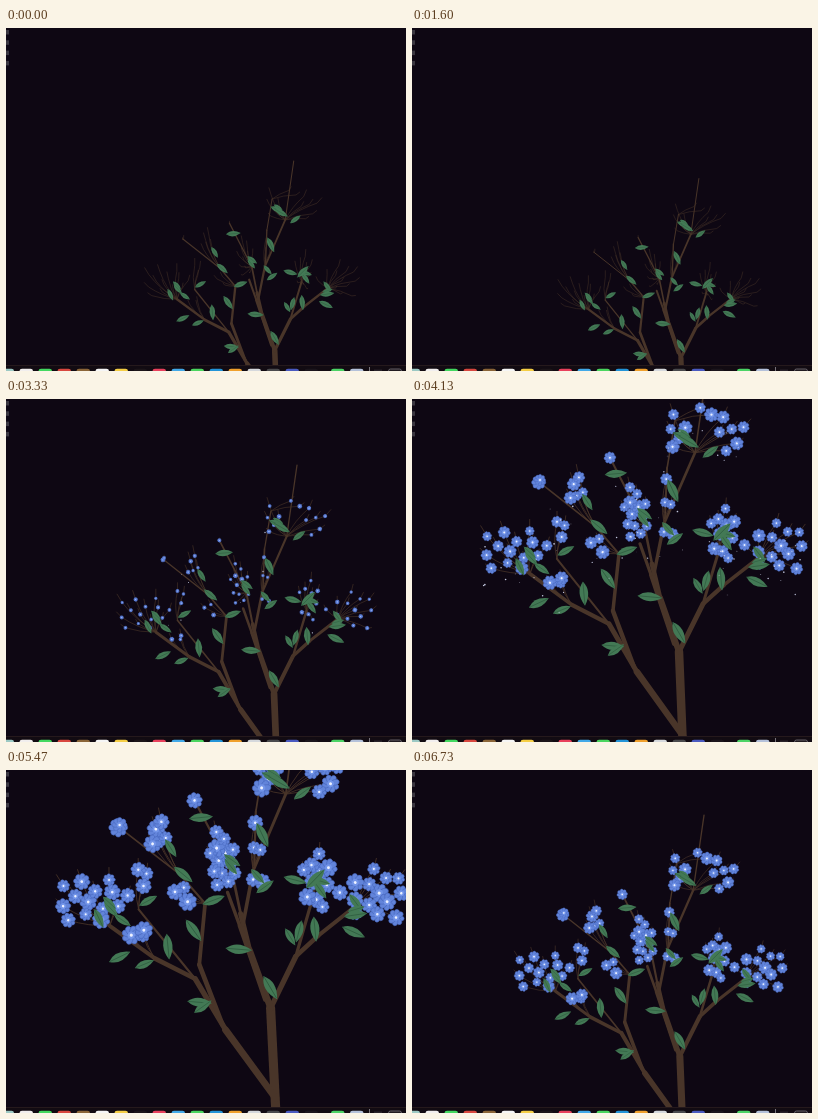
Animation, 400 px wide and 343 px high, one loop 6.8 s. Source, as an HTML page:

```html
<!DOCTYPE html>
<html lang="en">
<head>
<meta charset="utf-8">
<title>Blooming tree</title>
<style>
  html, body { margin: 0; width: 100%; height: 100%; overflow: hidden; background: #0e0713; }
  svg { display: block; width: 100vw; height: 100vh; }
</style>
</head>
<body>
<svg id="stage" viewBox="0 0 400 343" preserveAspectRatio="none">
  <defs>
    <g id="leaf">
      <path d="M-.5 0Q-.08 -.36 .5 0Q-.08 .36 -.5 0Z" fill="#437955"/>
      <path d="M-.5 0H.45" stroke="#2d5a3e" stroke-width=".03"/>
    </g>
    <g id="flower"></g>
  </defs>
  <g id="tree">
    <g id="wood" fill="none" stroke="#493529" stroke-linecap="round"></g>
    <g id="blooms"></g>
    <g id="leaves"></g>
    <g id="pollen" fill="#d5dbf4"></g>
  </g>
  <g id="icons" fill="#3b3740"></g>
  <g id="dock"></g>
</svg>
<script>
const LOOP = 6800;
const GOLDEN = 2.4;
const $ = id => document.getElementById(id);

function add(parent, tag, attrs) {
  const node = document.createElementNS('http://www.w3.org/2000/svg', tag);
  for (const key in attrs) node.setAttribute(key, attrs[key]);
  return parent.appendChild(node);
}

let seed = 4711;
const random = () => (seed = (seed * 16807) % 2147483647) / 2147483647;
const between = (lo, hi) => lo + (hi - lo) * random();

// Start width, then x, y pairs; branches taper towards the tip.
const branches = [
  [8.5, 271, 350, 267, 253],
  [5, 267, 253, 291, 205, 312, 186, 348, 158],
  [3, 291, 205, 308, 148],
  [6, 267, 253, 248, 199, 240, 165],
  [4, 262, 245, 239, 176, 228, 145],
  [3.4, 242, 175, 252, 125, 283, 54],
  [2.6, 240, 165, 232, 125, 198, 59],
  [1.6, 283, 54, 296, -36],
  [2, 253, 120, 255, 70, 263, 22],
  [6.5, 271, 337, 225, 273],
  [5, 225, 273, 197, 225, 160, 206, 118, 175],
  [4.4, 222, 268, 201, 212, 207, 155],
  [2, 207, 155, 184, 128, 127, 83],
  [2, 197, 225, 145, 160]
];

// Elliptical flower heads: centre, radii, count.
const heads = [
  [103, 150, 36, 24, 14],
  [145, 183, 10, 5, 3],
  [128, 83, 4, 2, 2],
  [165, 92, 9, 15, 5],
  [150, 130, 9, 11, 3],
  [187, 146, 9, 14, 3],
  [223, 115, 14, 28, 13],
  [198, 59, 0, 0, 1],
  [255, 110, 7, 38, 5],
  [265, 34, 13, 20, 5],
  [296, 8, 9, 25, 2],
  [319, 36, 20, 21, 6],
  [311, 135, 13, 33, 10],
  [364, 149, 31, 28, 14]
];

// Centre and angle.
const leafSpots = [
  [127, 204, -25], [150, 211, -22], [172, 195, 85], [196, 180, 55], [108, 168, 65],
  [201, 247, 5], [204, 251, -35], [238, 198, 5], [267, 234, 60], [286, 187, 60],
  [294, 182, 105], [309, 180, 85], [345, 183, 25], [347, 167, -8], [310, 133, -45],
  [291, 134, 15], [263, 140, -35], [261, 92, 65], [204, 75, -5], [270, 38, 25],
  [277, 43, 30], [215, 152, -20], [187, 128, 40], [154, 152, -28], [130, 170, 35]
];

const growth = [[0, .656], [870, .673], [1600, .62], [2330, .552], [2930, .68], [4130, 1], [5000, 1.055],
  [6000, 1.078], [6250, 1.02], [6600, .862], [6800, .825]];
const lean = [[4130, 0], [5000, -.2], [6000, -.8], [6600, 0]];
const bloomSize = [[2700, 0], [3300, .35], [4130, .85], [5000, 1.03], [6000, 1.03], [6800, .91]];

const blooms = [], pollen = [];

function buildFlower() {
  for (let i = 0; i < 8; i++) {
    add($('flower'), 'ellipse', { cx: .56, rx: .48, ry: .34, fill: '#6284da', stroke: '#4666bd',
      'stroke-width': .07, transform: `rotate(${i * 45})` });
  }
  add($('flower'), 'circle', { r: .4, fill: '#7294e8' });
  add($('flower'), 'circle', { r: .17, fill: '#eef2ff' });
}

const joints = [];
function buildBranch([width, ...p]) {
  for (let i = 0; i + 3 < p.length; i += 2) {
    const [x1, y1, x2, y2] = p.slice(i, i + 4);
    add($('wood'), 'line', { x1, y1, x2, y2, 'stroke-width': width * (1 - .4 * i / (p.length - 2)) });
    joints.push([x2, y2]);
  }
}

function jointBelow(x, y) {
  const distance = joint => Math.hypot(joint[0] - x, joint[1] - y);
  return joints.filter(joint => joint[1] >= y).sort((a, b) => distance(a) - distance(b))[0];
}

function addLeaf(x, y, angle, length) {
  add($('leaves'), 'use', { href: '#leaf',
    transform: `translate(${x} ${y}) rotate(${angle}) scale(${length})` });
}

function buildHead([cx, cy, rx, ry, count]) {
  const [hx, hy] = jointBelow(cx, cy);
  for (let i = 0; i < count; i++) {
    const spread = Math.sqrt((i + .5) / count) * between(.9, 1.1), angle = i * GOLDEN + cx;
    const x = cx + rx * spread * Math.cos(angle), y = cy + ry * spread * Math.sin(angle);
    const dx = x - hx, dy = y - hy;
    add($('wood'), 'path', { d: `M${hx} ${hy}q${dx / 2 + dy * .12} ${dy / 2 - dx * .08} ${dx} ${dy}`
      + `l${dx * .15} ${dy * .2 - 3}`, 'stroke-width': .9, opacity: .85 });
    blooms.push({ x, y, r: between(5.3, 8.2), turn: between(0, 45),
      node: add($('blooms'), 'use', { href: '#flower' }) });
    pollen.push({ x: x + between(-13, 13), y: y + between(5, 22), fall: between(6, 24),
      end: between(4150, 5300), node: add($('pollen'), 'circle', { r: between(.4, .85) }) });
    if (i % 5 === 4) addLeaf((x + hx) / 2, (y + hy) / 2, between(-40, 70), between(15, 20));
  }
}

function buildDesktop() {
  for (let i = 0; i < 4; i++) add($('icons'), 'rect', { x: 0, y: 2 + i * 10.3, width: 3, height: 4.5 });
  add($('dock'), 'rect', { y: 337, width: 400, height: 6, fill: '#120b12' });
  add($('dock'), 'rect', { y: 337, width: 400, height: .8, fill: '#2a1d1e' });
  const colors = ['#9cc9c4', '#f1eeee', '#43d860', '#d8473f', '#8b6538', '#f5f5f5', '#f5ce45', '#1c1519',
    '#e8405c', '#42a9e8', '#4ad55f', '#2394d8', '#f0a02c', '#d5d8dc', '#4a4a4d', '#4a5ac0', '#1b151c',
    '#4bd365', '#b4c1da'];
  colors.forEach((fill, i) => {
    add($('dock'), 'rect', { x: i * 19 - 5.5 + (i > 16 ? 7.5 : 0), y: 340.7, width: 13.5, height: 8, rx: 2.5, fill });
  });
  add($('dock'), 'rect', { x: 363, y: 339, width: 1, height: 4, fill: '#77727a' });
  add($('dock'), 'rect', { x: 368, y: 341.5, width: 8, height: 2, fill: '#29232a' });
  add($('dock'), 'rect', { x: 382.5, y: 341, width: 13, height: 8, rx: 2, fill: '#211b20', stroke: '#77727a',
    'stroke-width': .8 });
}

// Smooth curve through [time, value] keys, constant outside them.
function curve(keys, t) {
  const n = keys.length - 1;
  let i = 0;
  while (i < n - 1 && t > keys[i + 1][0]) i++;
  const slope = k => {
    const a = keys[Math.max(0, k - 1)], b = keys[Math.min(n, k + 1)];
    return (b[1] - a[1]) / (b[0] - a[0]);
  };
  const [t0, v0] = keys[i], [t1, v1] = keys[i + 1];
  const span = t1 - t0, u = Math.min(1, Math.max(0, (t - t0) / span)), w = 1 - u;
  return v0 * (1 + 2 * u) * w * w + v1 * u * u * (3 - 2 * u)
    + span * u * w * (slope(i) * w - slope(i + 1) * u);
}

function render(t) {
  $('tree').setAttribute('transform',
    `translate(272 455) rotate(${curve(lean, t)}) scale(${curve(growth, t)}) translate(-272 -455)`);
  const size = Math.max(0, curve(bloomSize, t));
  $('blooms').setAttribute('visibility', size ? 'visible' : 'hidden');
  for (const { x, y, r, turn, node } of blooms) {
    node.setAttribute('transform', `translate(${x} ${y}) rotate(${turn}) scale(${r * size})`);
  }
  for (const { x, y, fall, end, node } of pollen) {
    const age = (t - end + 900) / 900;
    node.setAttribute('cx', x);
    node.setAttribute('cy', y + fall * age);
    node.setAttribute('opacity', age > 0 && age < 1 ? Math.min(1, 3 * (1 - age)) * .9 : 0);
  }
}

buildFlower();
branches.forEach(buildBranch);
heads.forEach(buildHead);
leafSpots.forEach(([x, y, angle]) => addLeaf(x, y, angle, between(18, 25)));
buildDesktop();

const start = performance.now();
function tick() {
  const t = Math.max(0, performance.now() - start) % LOOP;
  render(Math.floor(t * .015 + .1) / .015);
  requestAnimationFrame(tick);
}
tick();
</script>
</body>
</html>
```
